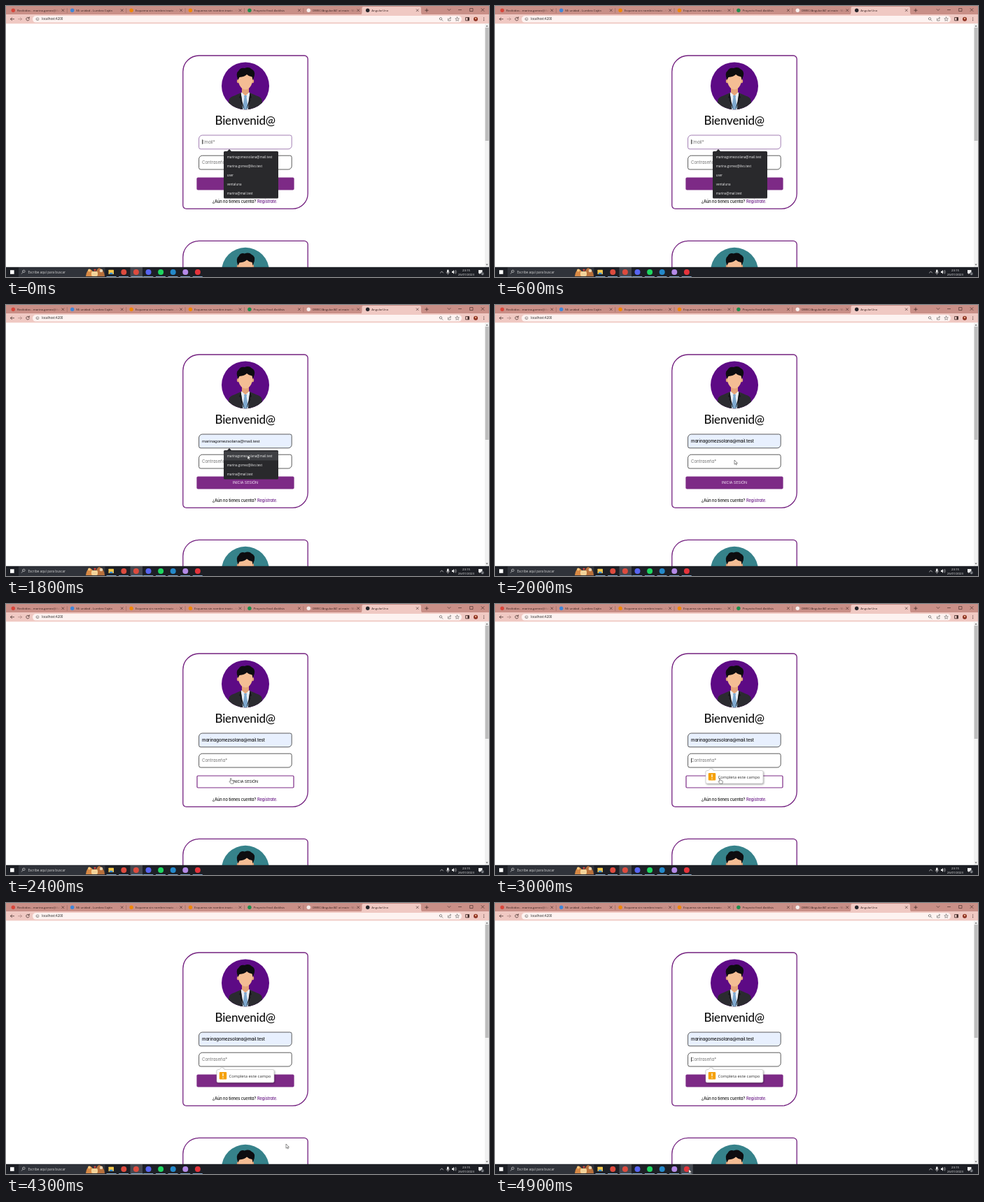
Recreate the animation shown at these times as an HTML page. Size 690 by 388 pixels, loop 5 s.

```html
<!DOCTYPE html>
<html lang="es">
<head>
<meta charset="utf-8">
<title>Bienvenid@</title>
<style>
html, body { margin: 0; width: 100%; height: 100%; overflow: hidden; background: #fff; }
svg { display: block; width: 100%; height: 100%; }
text { white-space: pre; }
.ui { font-family: "Open Sans", "Noto Sans", sans-serif; }
.page { font-family: Inter, sans-serif; font-feature-settings: "cv11"; letter-spacing: -.1px; }
.title { font-family: Lato, sans-serif; letter-spacing: -.2px; font-weight: 500; }
.plain { font-family: "Liberation Sans", Arial, sans-serif; letter-spacing: 0; font-feature-settings: normal; }
.line { fill: none; stroke-linecap: round; stroke-linejoin: round; }
</style>
</head>
<body>
<svg id="stage" viewBox="0 0 690 388" preserveAspectRatio="none">
  <defs>
    <clipPath id="round"><circle cx="342" cy="114.4" r="34"/></clipPath>
    <linearGradient id="fade" x1="0" x2="1">
      <stop offset="0" stop-color="#c98f87" stop-opacity="0"/>
      <stop offset="1" stop-color="#c98f87"/>
    </linearGradient>
    <filter id="soft" x="-20%" y="-40%" width="140%" height="200%">
      <feDropShadow dx=".8" dy="1.2" stdDeviation="1.1" flood-opacity=".4"/>
    </filter>
    <g id="person" clip-path="url(#round)">
      <path d="M317 149 L318.5 134 Q320 130 326 128.500 L336 124 H348 L358 128.500 Q364 130 365.500 134 L367 149Z" fill="#2b2b30"/>
      <path d="M335.500 124.500 L342 120 L348.500 124.500 L345.500 149 H338.500Z" fill="#e9eef4"/>
      <path d="M337 114 H347 V124 L342 128.500 L337 124Z" fill="#e5a379"/>
      <path d="M340 128 H344 L343.600 131 L346 146 L342 149 L338 146 L340.400 131Z" fill="#7fa9cf"/>
      <path d="M335.500 124 L333 131 L335.500 133 L334.500 135 L341 149 L337.500 137Z M348.500 124 L351 131 L348.500 133 L349.500 135 L343 149 L346.500 137Z" fill="#17171b"/>
      <ellipse cx="331.600" cy="107.500" rx="1.800" ry="2.800" fill="#e5a379"/>
      <ellipse cx="352.400" cy="107.500" rx="1.800" ry="2.800" fill="#e5a379"/>
      <path d="M332 100 Q342 94 352 100 V108 Q351 115 346 118.500 Q342 120.500 338 118.500 Q333 115 332 108Z" fill="#f4bd94"/>
      <path d="M331.500 106 Q327.500 96 332.500 92.500 Q335 87.500 341 89 Q347 86.500 351 90.500 Q356.500 93 354.800 100 L352.600 106 L351.500 101.500 Q347 101 344 98 Q341 101.500 333.500 102Z" fill="#0d0d10"/>
    </g>
  </defs>

  <rect width="690" height="388" fill="#fff"/>
  <g id="cards"></g>

  <g class="page">
    <text class="title" x="341.700" y="169.800" font-size="17" text-anchor="middle" fill="#111">Bienvenid@</text>
    <path id="mailBox"/>
    <text id="mail" x="280" y="196.700" font-size="6.2"></text>
    <path id="passBox" fill="#fff" stroke="#333" stroke-width=".8"/>
    <text x="280" y="226.200" font-size="6.2" fill="#777">Contraseña*</text>
    <rect id="button" x="273" y="246" width="138" height="17" rx="1.200" stroke="#7d2a86" stroke-width="1.200"/>
    <text id="buttonText" x="342" y="256" font-size="5.4" text-anchor="middle">INICIA SESIÓN</text>
    <text x="295" y="281.700" font-size="5.75" fill="#151515" font-weight="500">¿Aún no tienes cuenta?</text>
    <text x="359" y="281.700" font-size="5.75" fill="#6a1b86" font-weight="500">Regístrate.</text>
  </g>
  <rect id="caret" width=".7" height="6.600" fill="#111"/>

  <g id="list" class="ui" font-size="4.5" fill="#f0f0f0">
    <path d="M315.500 208.500 L319 205 L322.500 208.500Z" fill="#29292c"/>
    <rect id="listBox" x="311" y="208" width="78" rx="1.500" fill="#29292c"/>
    <rect id="listHover" x="311" y="209.500" width="78" height="13" fill="#3e3f43"/>
    <g id="items"></g>
  </g>

  <g id="tip" class="ui">
    <path d="M303 238.500 H305 L308.500 234.800 L312 238.500 H381 Q383 238.500 383 240.500 V255 Q383 257 381 257 H303 Q301 257 301 255 V240.500 Q301 238.500 303 238.500Z" fill="#fff" stroke="#aaa" stroke-width=".5" filter="url(#soft)"/>
    <rect x="304.800" y="242" width="10.400" height="10.400" rx="1" fill="#f5a10a"/>
    <path d="M310 243.700 V248.300 M310 249.700 V250.900" stroke="#fff" stroke-width="1.300"/>
    <text x="318.500" y="249.700" font-size="5.9" fill="#333">Completa este campo</text>
  </g>

  <g id="chrome" class="ui"></g>
  <g id="taskbar" class="ui"></g>

  <path id="arrow" d="M0 0 V6.200 L1.500 4.900 L2.500 7 L3.400 6.600 L2.500 4.500 H4.400Z" fill="#fff" stroke="#222" stroke-width=".5"/>
  <path id="hand" d="M0 0 Q.8 -.9 1.500 0 V2.800 L4.300 3.400 Q5 3.600 4.900 4.600 L4.300 7.400 H.8 L-1.500 4.400 Q-1.300 3.500 0 4.300Z" fill="#fff" stroke="#222" stroke-width=".5"/>
</svg>

<script>
const $ = id => document.getElementById(id);
const MAIL = 'marinagomezsolana@mail.test';
const NAMES = [MAIL, 'marina.gomez@ilvo.test', 'user', 'ventaluna', 'marina@mail.test'];

const rect = (x, y, w, h, fill, rx = 0) =>
  `<rect x="${x}" y="${y}" width="${w}" height="${h}" rx="${rx}" fill="${fill}"/>`;
const dot = (x, y, r, fill) => `<circle cx="${x}" cy="${y}" r="${r}" fill="${fill}"/>`;
const line = (d, color, w = .7) =>
  `<path class="line" d="${d}" stroke="${color}" stroke-width="${w}"/>`;
const label = (x, y, s, fill, size = 4.3, anchor = 'start') =>
  `<text x="${x}" y="${y}" font-size="${size}" fill="${fill}" text-anchor="${anchor}">${s}</text>`;

// Rounded box with its own radius for each corner, clockwise from top left
const box = (x, y, w, h, a, b, c, d) =>
  `M${x + a} ${y}h${w - a - b}a${b} ${b} 0 0 1 ${b} ${b}v${h - b - c}a${c} ${c} 0 0 1 ${-c} ${c}` +
  `h${c + d - w}a${d} ${d} 0 0 1 ${-d} ${-d}v${a + d - h}a${a} ${a} 0 0 1 ${a} ${-a}z`;

function card(dy, color) {
  return `<g transform="translate(0 ${dy})">
    <path d="${box(252.8, 71, 178.4, 219.4, 23, 5, 22, 5)}" fill="#fff" stroke="#73207f" stroke-width="1.3"/>
    ${dot(342, 114.4, 34, color)}<use href="#person"/></g>`;
}

function browser() {
  const ink = '#3a2522';
  const tabs = [
    ['Recibidos - marina.gomez@ilvo.t', '#d8453a'],
    ['Mi unidad - Lumbra Cajón', '#3f86d8'],
    ['Esquema sin nombre.trazio - traz', '#f08705'],
    ['Esquema sin nombre.trazio - traz', '#f08705'],
    ['Proyecto final: Análisis', '#1e8e4e'],
    ['DWEC/Angular/A1 at main · Mar', '#f6efee'],
    ['AngularUno', '#25252b'],
  ];
  let s = rect(0, 0, 690, 12.5, '#c98f87') + rect(0, 12, 690, 13.3, '#f0c9c3');
  s += `<path d="M506 12.500Q508.500 12 508.500 9.500V3Q508.500 1 510.500 1H591Q593 1 593 3V9.500Q593 12 595.500 12.500Z" fill="#f0c9c3"/>`;
  tabs.forEach(([name, color], i) => {
    const x = 10.3 + i * 84.4;
    s += dot(x, 6.2, 2.7, color) + label(x + 5.6, 7.8, name, ink);
    if (i < 6) s += rect(x + 56, 2, 12, 9, 'url(#fade)') + rect(x + 68, 2, 5, 9, '#c98f87');
    s += line(`M${x + 69.5} 4.7l3 3m0 -3l-3 3`, ink, .6);
    if (i < 5) s += line(`M${x + 77} 3.500v6`, '#8f5e57', .5);
  });
  s += line('M598.800 6.200h4.400m-2.200 -2.200v4.400', ink);
  s += line('M631 4.500l2 2l2 -2M646.500 5.500h4M663 3.500h4v4h-4zM679 3.500l4 4m0 -4l-4 4', ink, .6);
  s += rect(38, 14, 613, 9.6, '#fdf3f1', 4.8);
  s += line('M11.500 18.700h-5m2 -2l-2 2l2 2', ink);
  s += line('M17.500 18.700h5m-2 -2l2 2l-2 2', '#a67f79');
  s += line('M33 17.300a2.300 2.300 0 1 0 .3 2M33.300 15.800v1.800h-1.800', ink);
  s += line('M43 18.700a2 2 0 1 0 4 0a2 2 0 1 0 -4 0M45 18.500v1.200', '#555', .5);
  s += label(51, 20.4, 'localhost:4200', '#222', 4.5);
  s += line('M619.300 18.200a1.700 1.700 0 1 0 3.400 0a1.700 1.700 0 1 0 -3.400 0M622.300 19.500l1.700 1.700', '#555', .6);
  s += line('M631.500 18v3h3.500v-1.200M632.700 19q0 -2 2.800 -2m-1 -1l1.100 1l-1.100 1', '#555', .6);
  s += line('M644.600 16l.8 1.800l2 .2l-1.500 1.300l.4 2l-1.700 -1l-1.700 1l.4 -2l-1.500 -1.300l2 -.2z', '#555', .55);
  s += line('M657 16.500h4.500v4.300h-4.500z', ink, .8) + rect(659.5, 16.5, 2, 4.3, ink);
  s += dot(671, 18.700, 3, '#8c2f20') + dot(671, 18, 1.2, '#e6b08b');
  for (const y of [16.8, 18.7, 20.6]) s += dot(682.7, y, .55, ink);
  s += rect(684, 25.3, 6, 348.7, '#f1f1f1') + rect(684.6, 31, 5, 162, '#bdbdbd');
  s += `<path d="M685.500 29.500l1.600 -2l1.600 2zM685.500 369.500l1.600 2l1.600 -2z" fill="#666"/>`;
  return s;
}

function taskbar() {
  const white = '#eee';
  let s = rect(0, 373.8, 690, 14.2, '#1d1f25') + rect(6, 378.2, 5.6, 5.6, '#fff');
  s += rect(18, 374.3, 123.5, 13.7, '#30333a');
  s += line('M23.700 379.800a1.700 1.700 0 1 0 3.400 0a1.700 1.700 0 1 0 -3.400 0M24 381.300l-1.700 2', white, .6);
  s += label(31.5, 382.7, 'Escribe aquí para buscar', '#d5d5d5', 4.7);
  // small festive picture in the search box
  s += `<path d="M114 387q1 -9 6 -10q5 1 6 10z" fill="#d98a45"/><path d="M128 387q0 -10 5 -12q7 2 8 12z" fill="#b9713c"/>`;
  s += rect(122, 380, 9, 7, '#f3d39a', 2) + dot(119, 378.5, 2, '#f4c47a') + dot(136, 379, 2.3, '#e9d2b0') + dot(127, 378, 1.6, '#d6453c');
  s += rect(177.5, 374, 17.5, 14, '#454850');
  s += `<rect id="taskHover" x="265.300" y="374" width="17.500" height="14" fill="#454850"/>`;
  s += rect(146.5, 377.7, 7.5, 6.4, '#f6c84c', .6) + rect(148, 381.8, 4.5, 2.3, '#3b8fd0');
  const apps = ['#dd4b3e', '#dd4b3e', '#5865f2', '#1ed760', '#2489ca', '#b58ae8', '#e5333b'];
  apps.forEach((c, i) => s += dot(168.3 + i * 17.6, 380.9, 4, c));
  for (let i = 0; i < 8; i++) s += rect(143.5 + i * 17.6, 387.1, i == 2 ? 17 : 14, .9, '#8fb8de');
  s += line('M620.500 382l2 -2l2 2', white);
  s += rect(630, 377.5, 2.6, 4.4, white, 1.3) + line('M629 381q0 2 2.300 2q2.300 0 2.300 -2M631.300 383v1.300', white, .5);
  s += `<path d="M637 379.700h1.300l1.700 -1.700v5.800l-1.700 -1.700h-1.300z" fill="${white}"/>`;
  s += line('M641.200 379.300q1 1.500 0 3M642.600 378.300q1.800 2.500 0 5', white, .5);
  s += label(657.5, 379.7, '23:15', white, 4.3, 'middle') + label(657.5, 386.1, '26/01/2023', white, 4.3, 'middle');
  s += `<path d="M675 378h5.500v4.800h-2.700l-1.500 1.500v-1.500h-1.300z" fill="${white}"/>`;
  s += dot(680.7, 383.3, 2.3, '#555960') + label(680.7, 384.6, '2', white, 3.4, 'middle');
  return s;
}

$('cards').innerHTML = card(0, '#5d0a85') + card(265.4, '#36828a');
$('chrome').innerHTML = browser();
$('taskbar').innerHTML = taskbar();
$('mailBox').setAttribute('d', box(275.6, 185, 132.6, 19.8, 5, 2.5, 5, 2.5));
$('passBox').setAttribute('d', box(275.6, 214.2, 132.6, 19.8, 5, 2.5, 5, 2.5));

// Pointer stops: time, x, y
const PATH = [
  [1600, 352, 224], [1700, 347, 218], [1800, 345, 215], [1900, 345, 215], [2000, 342, 222],
  [2100, 334, 240], [2200, 324, 249], [2400, 320.5, 249.8], [3900, 320.5, 249.8],
  [4000, 372, 268], [4100, 430, 302], [4200, 454, 332], [4300, 400, 345],
  [4400, 316, 360], [4500, 287, 374], [4600, 278, 380], [4900, 276.8, 381],
];

function pointer(t) {
  if (t < PATH[0][0]) return null;
  const i = PATH.findIndex(p => p[0] >= t);
  if (i < 1) return PATH.at(i).slice(1);
  const [t0, x0, y0] = PATH[i - 1], [t1, x1, y1] = PATH[i];
  const k = (t - t0) / (t1 - t0);
  return [x0 + (x1 - x0) * k, y0 + (y1 - y0) * k];
}

const set = (id, attrs) => {
  for (const k in attrs) $(id).setAttribute(k, attrs[k]);
};
const show = (id, on) => set(id, { visibility: on ? 'visible' : 'hidden' });

function draw(t) {
  const typing = t >= 1000, preview = t >= 1700, picked = t >= 2000;
  const hover = t >= 2200 && t < 4000, sent = t >= 2700;

  // email field
  const typed = Math.min(6, [1, 2, 3, 5, 6][Math.floor((t - 1000) / 100)] ?? 6);
  const mail = $('mail');
  mail.textContent = preview ? MAIL : typing ? MAIL.slice(0, typed) : 'Email*';
  set('mail', {
    class: preview && !picked ? 'plain' : '',
    'font-size': preview && !picked ? 6 : 6.2,
    'font-weight': typing && (!preview || picked) ? 500 : 400,
    fill: typing ? '#111' : '#777',
  });
  set('mailBox', {
    fill: preview ? '#e8f0fe' : '#fff',
    stroke: preview ? '#333' : '#7b4a94',
    'stroke-width': preview ? .8 : .7,
  });

  // suggestions
  const names = typing ? NAMES.filter(n => n.startsWith('marina')) : NAMES;
  show('list', !picked);
  set('listBox', { height: names.length * 13 + 2.5 });
  set('listHover', { opacity: preview ? 1 : 0 });
  $('items').innerHTML = names.map((n, i) => label(315.7, 217.7 + i * 13, n, '#eee', 4.5)).join('');

  // button and warning
  set('button', { fill: hover ? '#fff' : '#7d2a86' });
  set('buttonText', { fill: hover ? '#111' : '#f1dff3' });
  show('tip', sent);

  const blink = Math.floor((t - 2700) / 500) % 2 == 0;
  show('caret', sent ? blink : !preview);
  set('caret', sent
    ? { x: 280, y: 220.7 }
    : { x: typing ? 280.3 + mail.getComputedTextLength() : 280, y: 191.2 });

  // pointer
  const p = pointer(t);
  show('arrow', p && !hover);
  show('hand', p && hover);
  if (p) set(hover ? 'hand' : 'arrow', { transform: `translate(${p})` });
  show('taskHover', t >= 4500);
}

function tick(now) {
  draw(Math.floor(now % 5000 / 100) * 100);
  requestAnimationFrame(tick);
}
draw(0);
requestAnimationFrame(tick);
</script>
</body>
</html>
```
